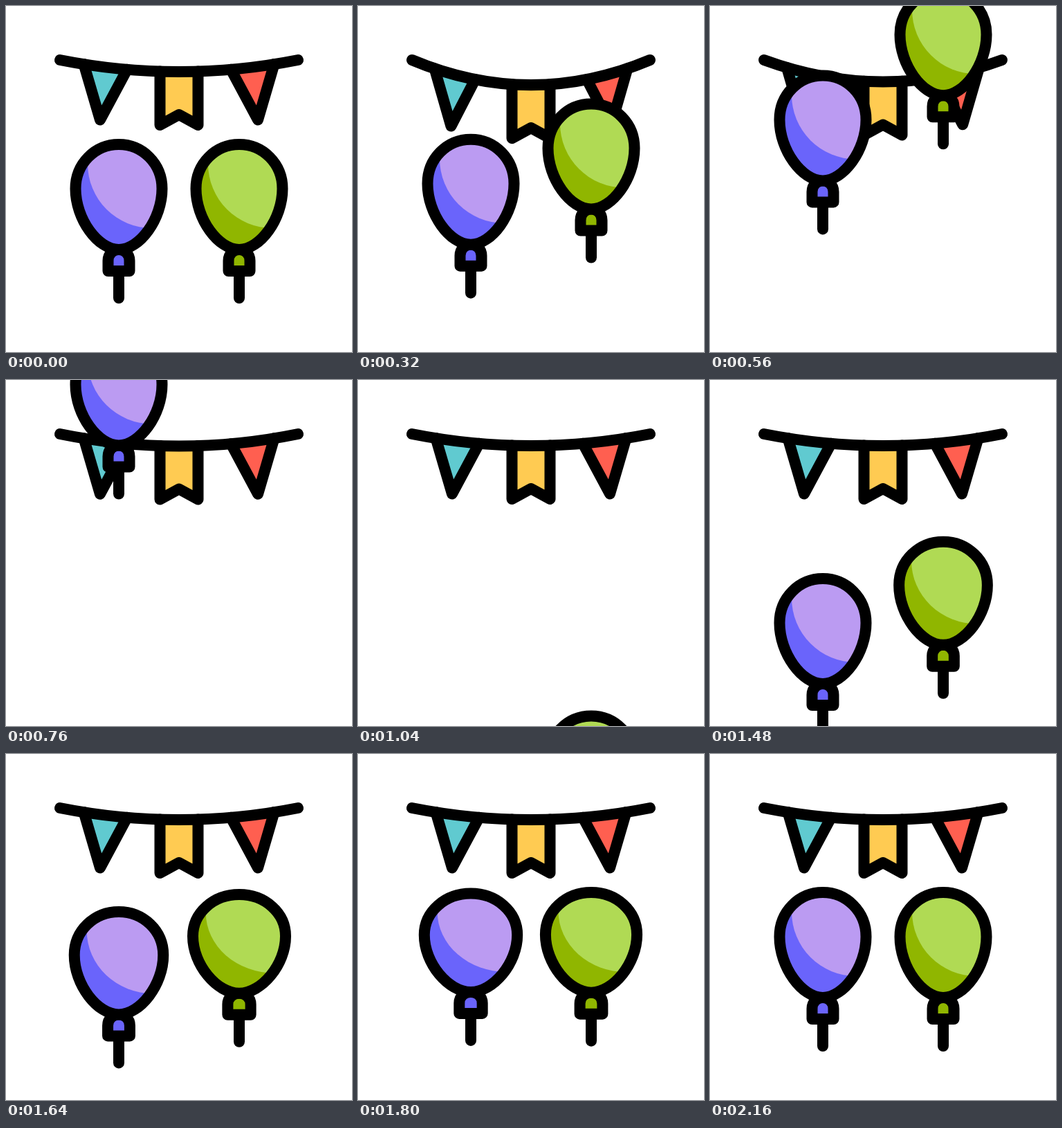
Animation of 500 by 500 pixels, one loop 2280 ms. Source, as an HTML page with a canvas:

```html
<!DOCTYPE html>
<html>
<head>
<meta charset="utf-8">
<title>Balloons and bunting</title>
<style>
html, body { margin: 0; width: 100%; height: 100%; overflow: hidden; background: #fff; }
canvas { display: block; }
</style>
</head>
<body>
<canvas id="stage" width="500" height="500"></canvas>
<script>
const ctx = document.getElementById('stage').getContext('2d');
const LOOP = 2280, STEP = 40;

// Smooth bump: 0 at start, 1 at peak, 0 at end
function bump(t, start, peak, end) {
  if (t <= start || t >= end) return 0;
  const u = t < peak ? (t - start) / (peak - start) : (end - t) / (end - peak);
  return Math.sin(u * Math.PI / 2) ** 2;
}

function paint(path, fill) {
  if (fill) {
    ctx.fillStyle = fill;
    ctx.fill(path);
  }
  ctx.stroke(path);
}

// Left open at the top, where the rope covers it
function flag(points, fill) {
  const path = new Path2D();
  points.forEach(([x, y]) => path.lineTo(x, y));
  paint(path, fill);
}

function bunting(t) {
  const drop = 22.2 * bump(t, 70, 400, 800);
  const sag = 17 + drop;
  const onRope = x => {
    const u = (x - 78) / 344;
    return [x, 78 + sag * 4 * u * (1 - u)];
  };
  const triangle = (mirror, fill) => {
    const outer = 112.5 - 0.1 * drop, inner = 175 - 0.3 * drop, tip = 136 - 0.08 * drop;
    const flip = x => mirror ? 500 - x : x;
    flag([onRope(flip(outer)), [flip(tip), 164.5 + 0.47 * drop], onRope(flip(inner))], fill);
  };
  triangle(false, '#60cad0');
  triangle(true, '#ff5f50');
  flag([onRope(222.5), [222.5, 172 + drop], [250, 157 + drop],
        [277.5, 172 + drop], onRope(277.5)], '#ffcb52');
  paint(new Path2D(`M78 78Q250 ${78 + 2 * sag} 422 78`));
}

const BODY = new Path2D('M0 0C34.5 0 62.5 28 62.5 64C62.5 108 30 152 0 152S-62.5 108 -62.5 64C-62.5 28 -34.5 0 0 0Z');
const KNOT = new Path2D('M-15.5 31V16C-15.5 6 -8 0 0 0S15.5 6 15.5 16V31Z');
const STRING = new Path2D('M0 31V70');

function scaled(path, sx, sy) {
  const out = new Path2D();
  out.addPath(path, new DOMMatrix([sx, 0, 0, sy, 0, 0]));
  return out;
}

// Rises out at the top, comes back from below, and squashes on arrival
function balloon(x, t, leave, arrive, light, dark) {
  const rise = -0.00092 * Math.max(0, t - leave) ** 2;
  const back = 0.000636 * Math.max(0, arrive - t) ** 2;
  const dy = t < arrive - 780 ? rise : back;
  const squash = bump(t, arrive - 350, arrive - 10, arrive + 280);
  const sx = 1 + 0.078 * squash, sy = 1 - 0.066 * squash;
  const body = scaled(BODY, sx, sy);

  ctx.save();
  ctx.translate(x, 200 + dy);

  ctx.save();
  ctx.translate(0, 152 * sy);
  paint(STRING);
  paint(scaled(KNOT, sx, 1), dark);
  ctx.restore();

  ctx.fillStyle = dark;
  ctx.fill(body);
  ctx.save();
  ctx.clip(body);
  ctx.scale(sx, sy);
  ctx.fillStyle = light;
  ctx.beginPath();
  ctx.arc(48, 28, 93, 0, 2 * Math.PI);
  ctx.fill();
  ctx.restore();
  paint(body);

  ctx.restore();
}

function draw(t) {
  ctx.fillStyle = '#fff';
  ctx.fillRect(0, 0, 500, 500);
  ctx.strokeStyle = '#000';
  ctx.lineWidth = 16;
  ctx.lineCap = ctx.lineJoin = 'round';
  bunting(t);
  balloon(163, t, 231, 1850, '#bb9bf2', '#6a64fb');
  balloon(337, t, 68, 1710, '#b0da54', '#90b600');
}

const begin = performance.now();
function frame() {
  const t = (performance.now() - begin) % LOOP;
  draw(Math.floor(t / STEP) * STEP);
  requestAnimationFrame(frame);
}
frame();
</script>
</body>
</html>
```
